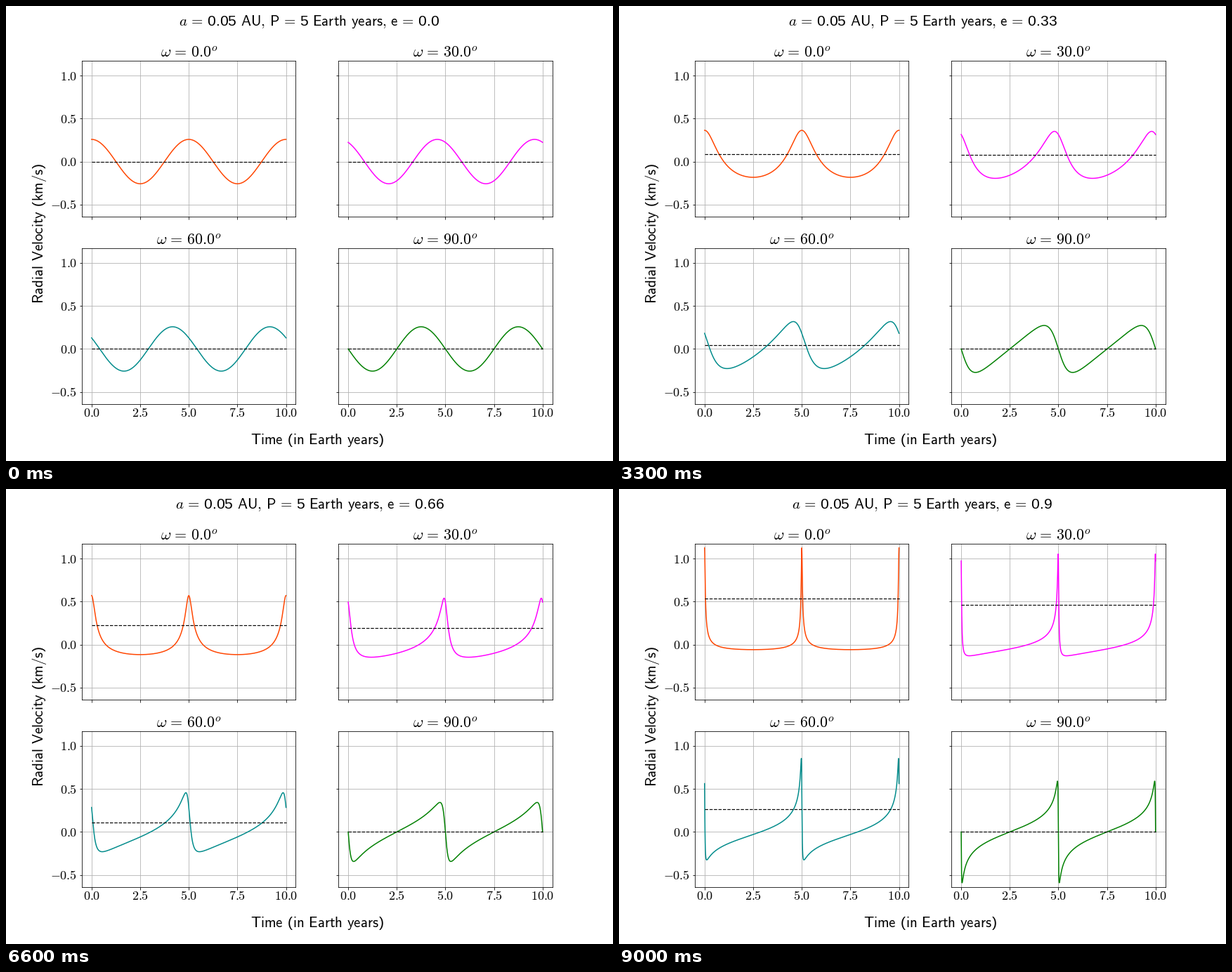
A matplotlib script for the animation above (9.1 s loop, 864 by 648 pixels).

```python
import numpy as np
import matplotlib.pyplot as plt
from matplotlib.animation import FuncAnimation

plt.rcParams.update({"font.family": "Liberation Sans", "mathtext.fontset": "cm"})

W, H, DPI = 864, 648, 72
FRAMES, INTERVAL = 91, 100
PERIOD = 5.0
# Orbital speed in km/s of a 0.05 AU, 5 year orbit inclined by 60 degrees
K0 = 2 * np.pi * 0.05 / PERIOD * 4.7405 * np.sin(np.pi / 3)
E_MAX = 0.9
K_MAX = K0 / np.sqrt(1 - E_MAX ** 2)
PANELS = [(0, "orangered"), (30, "magenta"), (60, "darkcyan"), (90, "green")]

t = np.linspace(0, 10, 1001)


def space(em):
    return r"\hspace{%g}" % em


def upright(s):
    return r"\mathregular{%s}" % s


def sans(s):
    """Sans-serif math string with text-like word spacing."""
    words = [upright(w) if w.replace(".", "").isdigit() else w
             for w in s.split()]
    s = " ".join(words)
    for c in "()":
        s = s.replace(c, "|" + upright(c) + "|")
    s = s.replace("|", space(0.03))
    s = s.replace(" = ", space(0.16) + "=" + space(0.16))
    s = s.replace(", ", "," + space(0.16)).replace(" ", space(0.36))
    return r"$\mathsf{%s}$" % s


def heading(e):
    return sans(rf"\mathit{{a}} = 0.05 AU, P = 5 Earth years, e = {e}")


def anomaly(e):
    """Cosine and sine of the true anomaly, from Kepler's equation."""
    m = (2 * np.pi * t / PERIOD + np.pi) % (2 * np.pi) - np.pi
    E = m + 0.85 * e * np.sign(m)
    for _ in range(12):
        E -= (E - e * np.sin(E) - m) / (1 - e * np.cos(E))
    r = 1 - e * np.cos(E)
    return (np.cos(E) - e) / r, np.sqrt(1 - e * e) * np.sin(E) / r


fig, axes = plt.subplots(2, 2, sharex=True, sharey=True,
                         figsize=(W / DPI, H / DPI), dpi=DPI)
fig.subplots_adjust(left=0.125, right=0.9, bottom=0.125, top=0.88,
                    wspace=0.2, hspace=0.2)

curves, means = [], []
for ax, (w, color) in zip(axes.flat, PANELS):
    gap = space(0.117)
    ax.set_title(rf"$\omega{gap}={gap}{w:.1f}^o$", fontsize=22, pad=1.5)
    ax.grid(True)
    ax.tick_params(labelsize=18)
    ax.tick_params(axis="x", pad=2)
    curves += ax.plot(t, 0 * t, color=color, lw=1.5)
    means += ax.plot([0, 10], [0, 0], "k--", lw=1.2)

ax = axes[0, 0]
ax.set(xlim=(-0.5, 10.5),
       ylim=(-K_MAX - 0.05, K_MAX * (1 + E_MAX) + 0.05),
       xticks=np.arange(0, 10.1, 2.5), yticks=np.arange(-0.5, 1.1, 0.5))
for axis in (ax.xaxis, ax.yaxis):
    axis.set_major_formatter(lambda v, _: f"${v:.1f}$")

title = fig.suptitle(heading(0.0), fontsize=21, x=0.5, y=0.983, va="top")
fig.text(442.5 / W, 1 - 619 / H, sans("Time (in Earth years)"),
         fontsize=21, ha="center", va="center")
fig.text(48 / W, 0.5, sans("Radial Velocity (km/s)"),
         fontsize=21, ha="center", va="center", rotation=90)


def update(i):
    e = round(i / 100, 2)
    k = K0 / np.sqrt(1 - e * e)
    cos_nu, sin_nu = anomaly(e)
    for (w, _), curve, mean in zip(PANELS, curves, means):
        c, s = np.cos(np.radians(w)), np.sin(np.radians(w))
        curve.set_ydata(k * (cos_nu * c - sin_nu * s + e * c))
        mean.set_ydata([k * e * c] * 2)
    title.set_text(heading(e))
    return [title, *curves, *means]


anim = FuncAnimation(fig, update, frames=FRAMES, interval=INTERVAL,
                     repeat=True, repeat_delay=0)
plt.show()
```
